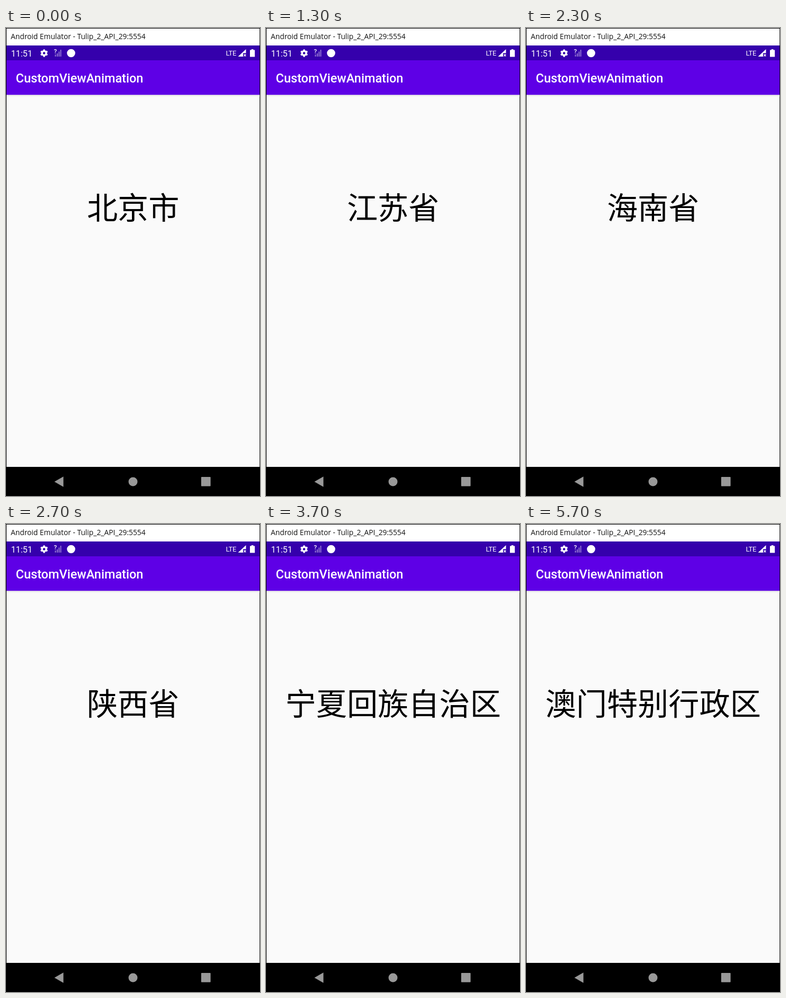
An HTML page for the animation above (5800 ms loop, 480 by 884 pixels).

```html
<!DOCTYPE html>
<html lang="zh-CN">
<head>
<meta charset="utf-8">
<title>CustomViewAnimation</title>
<style>
html, body { margin: 0; width: 100%; height: 100%; overflow: hidden; background: #000; }
svg { display: block; width: 480px; height: 884px; }
text { font-family: Roboto, sans-serif; fill: #fff; }
.window { font: 13.8px "Open Sans", sans-serif; fill: #111; }
.clock { font-size: 16.2px; }
.net { font-size: 13.2px; letter-spacing: -.4px; }
.title { font-size: 23.5px; font-weight: 500; }
#province { font: 58.2px "Noto Sans CJK SC", "Noto Sans CJK", sans-serif; fill: #000; text-anchor: middle; }
</style>
</head>
<body>
<svg viewBox="0 0 480 884">
  <defs>
    <linearGradient id="shade" x2="0" y2="1">
      <stop stop-color="#e2e2e2"/><stop offset="1" stop-color="#fafafa"/>
    </linearGradient>
  </defs>
  <rect width="480" height="884"/>
  <rect x="1" y="1" width="478.2" height="32" fill="#fff"/>
  <text class="window" x="9" y="21">Android Emulator - Tulip_2_API_29:5554</text>

  <rect x="1" y="126" width="478.2" height="703" fill="#fafafa"/>
  <rect x="1" y="126" width="478.2" height="4" fill="url(#shade)"/>
  <rect x="1" y="33" width="478.2" height="28" fill="#3500ac"/>
  <rect x="1" y="61" width="478.2" height="65.2" fill="#5e00e6"/>

  <!-- status bar -->
  <text class="clock" x="9.5" y="53.5">11:51</text>
  <g fill="none" stroke="#fff">
    <circle cx="72" cy="47.5" r="4" stroke-width="3.4"/>
    <circle cx="72" cy="47.5" r="6" stroke-width="2.4" pathLength="12" stroke-dasharray="1" stroke-dashoffset="-.5"/>
  </g>
  <path d="M93.5 54v-4M97 54v-6M100.3 54v-9.5M103.5 54v-13" stroke="#8e72cf" stroke-width="2"/>
  <text x="90.5" y="48" font-size="11.5" font-weight="500">?</text>
  <circle cx="123" cy="47.5" r="7.8" fill="#fff"/>
  <text class="net" x="415.5" y="52.3">LTE</text>
  <path d="M438.5 54L453.5 40V47.5H448V54Z" fill="#fff"/>
  <path d="M449.5 49.5l3.8 4M453.3 49.5l-3.8 4" stroke="#fff" stroke-width="1.2"/>
  <path d="M461 41.5h2.8V40h3.6v1.5h2.8V54.5h-9.2z" fill="#fff"/>

  <text class="title" x="18.6" y="103">CustomViewAnimation</text>
  <text id="province" x="240.2" y="361"></text>

  <!-- navigation bar -->
  <g fill="#999">
    <path d="M91.5 857L108.5 847.3V866.7Z"/>
    <circle cx="240" cy="857" r="8.5"/>
    <rect x="368.8" y="848" width="17.8" height="17.6" rx="1"/>
  </g>
</svg>
<script>
const provinces = ('北京市 天津市 上海市 重庆市 河北省 山西省 辽宁省 吉林省 黑龙江省 江苏省 浙江省 安徽省 ' +
  '福建省 江西省 山东省 河南省 湖北省 湖南省 广东省 海南省 四川省 贵州省 云南省 陕西省 甘肃省 青海省 ' +
  '台湾省 内蒙古自治区 广西壮族自治区 西藏自治区 宁夏回族自治区 新疆维吾尔自治区 香港特别行政区 澳门特别行政区').split(' ');
const LOOP = 5800, STEP = 100, DURATION = 5000, LEAD = 490;
const label = document.getElementById('province');
const start = performance.now();

function draw() {
  const elapsed = (performance.now() - start) % LOOP;
  const time = Math.floor(elapsed / STEP) * STEP;
  const progress = Math.min(1, (time + LEAD) / DURATION);
  const eased = (1 - Math.cos(Math.PI * progress)) / 2;
  label.textContent = provinces[Math.floor(eased * (provinces.length - 1))];
  requestAnimationFrame(draw);
}
draw();
</script>
</body>
</html>
```
